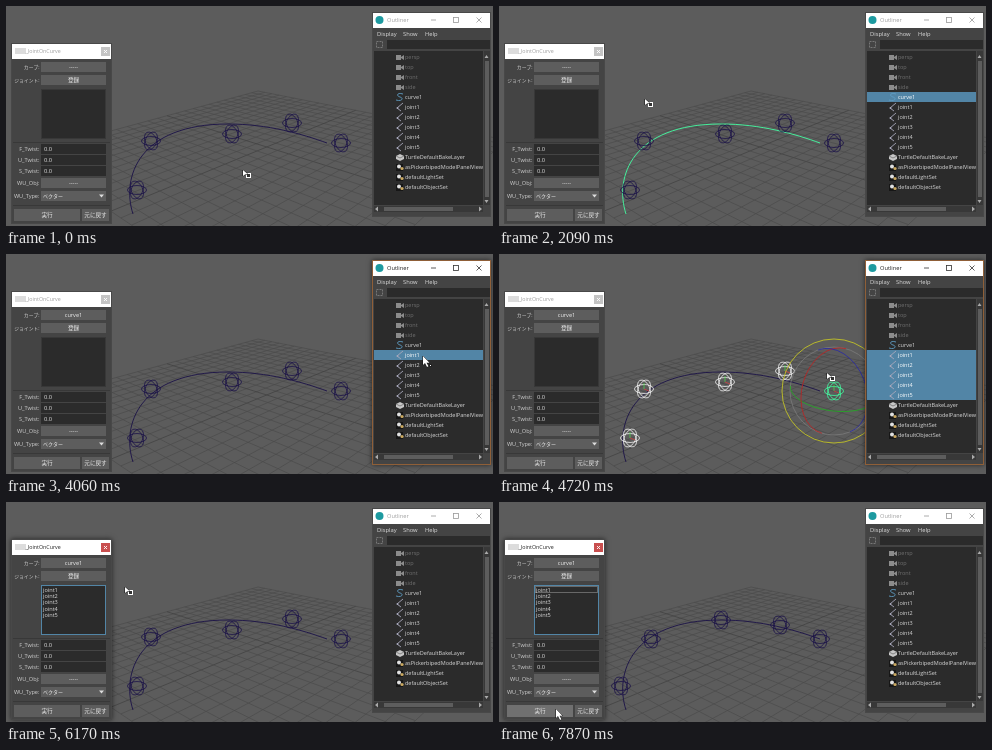
Recreate the animation shown at these times as an HTML page with a canvas. Size 487 by 220 pixels, loop 8000 ms.

```html
<!DOCTYPE html>
<html lang="ja">
<head>
<meta charset="utf-8">
<title>JointOnCurve</title>
<style>
html, body { margin: 0; width: 100%; height: 100%; overflow: hidden; background: #5c5c5c; }
canvas { display: block; width: 487px; height: 220px; }
</style>
</head>
<body>
<canvas id="stage"></canvas>
<script>
const W = 487, H = 220, LOOP = 8000;
const canvas = document.getElementById('stage');
const c = canvas.getContext('2d');
const scale = window.devicePixelRatio || 1;
canvas.width = W * scale;
canvas.height = H * scale;

const UI = '"Open Sans", "Noto Sans CJK JP", "Noto Sans CJK", sans-serif';
const NAVY = '#1b1248', DARK = '#2b2b2b', BLUE = '#5285a6', GREEN = '#43ffa3';

// cursor moves: start, end, number of steps, target x, target y
const moves = [
  [650, 890, 3, 192, 105], [1040, 1280, 3, 202, 141], [1700, 1820, 2, 226, 129],
  [1970, 2450, 5, 76, 62], [3160, 3280, 2, 400, 101], [3430, 3910, 5, 417, 102],
  [4450, 4570, 2, 414, 142], [4720, 4960, 3, 226, 91], [5110, 5470, 4, 83, 73],
  [6170, 6530, 4, 185, 108], [6650, 6770, 2, 109, 110], [6890, 6890, 1, 77, 167],
  [7010, 7010, 1, 66, 194], [7160, 7160, 1, 57, 207]
];
const loose = [[131, 184], [145, 135], [226, 128], [286, 117], [335, 137]];
const snapped = [[122, 184], [152, 137], [222, 118], [281, 123], [321, 137]];
const joints = [1, 2, 3, 4, 5].map(i => 'joint' + i);
const rows = ['persp', 'top', 'front', 'side', 'curve1', ...joints,
  'TurtleDefaultBakeLayer', 'asPickerbipedModelPanelView', 'defaultLightSet', 'defaultObjectSet'];

const within = (t, a, b) => t >= a && t < b;

function rect(x, y, w, h, fill, line) {
  if (fill) { c.fillStyle = fill; c.fillRect(x, y, w, h); }
  if (line) { c.strokeStyle = line; c.lineWidth = 1; c.strokeRect(x + .5, y + .5, w - 1, h - 1); }
}
function text(s, x, y, color = '#d0d0d0', size = 5.5, align = 'left') {
  c.font = `${size}px ${UI}`;
  c.textAlign = align;
  c.textBaseline = 'alphabetic';
  c.fillStyle = color;
  c.fillText(s, x, y + size * .36);
}
function stroke(d, color, width = 1) {
  c.strokeStyle = color;
  c.lineWidth = width;
  c.stroke(new Path2D(d));
}
function fill(d, color) {
  c.fillStyle = color;
  c.fill(new Path2D(d));
}
function ellipse(x, y, rx, ry, color, angle = 0, from = 0, to = Math.PI * 2) {
  c.beginPath();
  c.ellipse(x, y, rx, ry, angle, from, to);
  c.strokeStyle = color;
  c.lineWidth = .8;
  c.stroke();
}
function disc(x, y, r, color) {
  c.beginPath();
  c.arc(x, y, r, 0, 7);
  c.fillStyle = color;
  c.fill();
}
function panel(x, y, w, h, border, active) {
  c.save();
  c.shadowColor = active ? 'rgba(0,0,0,.6)' : 'transparent';
  c.shadowBlur = 5 * scale;
  rect(x, y, w, h, '#444');
  c.restore();
  rect(x, y, w, h, null, border);
  rect(x + 1, y + 1, w - 2, 15, '#fff');
}

function cursorAt(t) {
  let x = 237, y = 164;
  for (const [start, end, n, tx, ty] of moves) {
    if (t < start) break;
    const step = n > 1 ? (end - start) / (n - 1) : 1;
    const k = Math.min(1, (Math.floor((t - start) / step) + 1) / n);
    const e = 1 - (1 - k) ** 1.5;
    x += (tx - x) * e;
    y += (ty - y) * e;
  }
  return [Math.round(x), Math.round(y)];
}

// perspective map of the unit square onto the ground plane
const ground = (() => {
  const [[x0, y0], [x1, y1], [x2, y2], [x3, y3]] = [[252, 85], [500, 134], [290, 330], [20, 148]];
  const ax = x1 - x2, ay = y1 - y2, bx = x3 - x2, by = y3 - y2;
  const sx = x0 - x1 + x2 - x3, sy = y0 - y1 + y2 - y3, den = ax * by - bx * ay;
  const g = (sx * by - bx * sy) / den, h = (ax * sy - sx * ay) / den;
  return (u, v) => {
    const w = 1 + g * u + h * v;
    return [(x0 + (x1 - x0 + g * x1) * u + (x3 - x0 + h * x3) * v) / w,
            (y0 + (y1 - y0 + g * y1) * u + (y3 - y0 + h * y3) * v) / w];
  };
})();

function drawGrid() {
  const n = 24;
  for (let i = 0; i <= n; i++) {
    const k = i / n, color = i === n / 2 ? '#404040' : '#4b4b4b';
    stroke(`M${ground(k, 0)}L${ground(k, 1)}`, color, .7);
    stroke(`M${ground(0, k)}L${ground(1, k)}`, color, .7);
  }
}

// three orthogonal rings seen from above at an angle
function drawJoint([x, y], color) {
  const r = 9.5;
  ellipse(x, y, r, r * .47, color);
  ellipse(x, y, r, r * .6, color, 1.13);
  ellipse(x, y, r, r * .6, color, 2);
  if (color !== NAVY) {
    stroke(`M${x} ${y}v-6`, '#4fd44f', .8);
    stroke(`M${x} ${y}l5 2`, '#d04040', .8);
  }
}

function drawRotator([x, y]) {
  ellipse(x, y, 44, 44, '#7c7c7c');
  ellipse(x, y, 44, 20, '#20b020', .12, 0, Math.PI);
  ellipse(x, y, 44, 32, '#c02020', 1.85, 0, Math.PI);
  ellipse(x, y, 44, 32, '#2828a8', 1.2, Math.PI, Math.PI * 2);
  ellipse(x, y, 52, 52, '#d0d020');
}

function drawScene(t) {
  rect(0, 0, W, H, '#5c5c5c');
  drawGrid();
  const curveOn = within(t, 1400, 2760);
  stroke('M127 208C115 171 133 118 222 118C262 118 296 128 321 137', curveOn ? GREEN : NAVY, .9);
  const one = within(t, 4180, 4720), all = within(t, 4720, 6020);
  const places = t >= 7870 ? snapped : loose;
  places.forEach((p, i) => {
    const last = (one && i === 0) || (all && i === 4);
    drawJoint(p, last ? GREEN : all ? '#f4f4f4' : NAVY);
  });
  if (one) drawRotator(places[0]);
  if (all) drawRotator(places[4]);
}

function drawIcon(i, y) {
  const x = 390;
  if (i < 4) {
    rect(x, y - 2, 5, 5, '#8c8c8c');
    fill(`M${x + 5} ${y}l3-2v5l-3-2z`, '#8c8c8c');
  } else if (i === 4) {
    stroke(`M${x + 7} ${y - 3}c-6-2-7 2-3 3s2 5-4 3`, '#5f9dc4', .9);
  } else if (i < 10) {
    stroke(`M${x + 7} ${y - 4}l-6 5 4 3`, '#a9a9bc', .9);
    disc(x + 1.5, y + 1, 1, '#a9a9bc');
  } else if (i === 10) {
    fill(`M${x} ${y - 1}l4-2 4 2v3l-4 2-4-2z`, '#c8c8c8');
    stroke(`M${x} ${y - 1}l4 2 4-2`, '#666', .7);
  } else {
    rect(x, y - 3, 7, 7, '#161616');
    disc(x + 3, y - .5, 2, '#e0e0e0');
    disc(x + 6, y + 1.5, 1.6, '#c9a860');
  }
}

function drawOutliner(t) {
  const active = within(t, 4060, 5870);
  panel(366, 6, 119, 205, active ? '#8f5f38' : '#484848', active);
  disc(373.5, 14, 4, '#1d9aa0');
  text('Outliner', 381, 14, active ? '#222' : '#a0a0a0', 5.7);
  const ink = active ? '#333' : '#999';
  stroke('M425 14h5M470.500 11.500l5 5m0-5l-5 5', ink, .8);
  c.strokeRect(447.5, 11.5, 5, 5);
  ['Display', 'Show', 'Help'].forEach((s, i) => text(s, [371, 397, 419][i], 27.5, '#ddd', 5.8));
  rect(381, 34, 103, 9, DARK);
  c.setLineDash([2, 1]);
  rect(370, 35, 7, 7, null, '#777');
  c.setLineDash([]);
  rect(368, 45, 109, 154, DARK);

  c.save();
  c.beginPath();
  c.rect(368, 45, 109, 154);
  c.clip();
  rows.forEach((name, i) => {
    const y = 51 + i * 10;
    const on = i === 4 ? within(t, 1400, 2760)
      : i === 5 ? within(t, 4060, 6020)
      : i > 5 && i < 10 && within(t, 4450 + (i > 7) * 120, 6020);
    if (on) rect(368, y - 5, 109, 10, BLUE);
    drawIcon(i, y);
    text(name, 399, y, i < 4 ? '#707070' : on ? '#fff' : '#d8d8d8');
  });
  c.restore();

  rect(478, 45, 6, 154, '#383838');
  rect(479, 55, 4, 136, '#5d5d5d');
  fill('M478.500 52l2-3 2 3zM478.500 194l2 3 2-3z', '#aaa');
  rect(368, 200, 109, 6, '#383838');
  rect(378, 201, 69, 4, '#5d5d5d');
  fill('M372 200.500l-3 2.500 3 2.500zM473 200.500l3 2.500-3 2.500z', '#aaa');
}

function drawButton(label, x, y, w, h, pointer, pressed) {
  const [px, py] = pointer;
  const over = within(px, x, x + w) && within(py, y, y + h);
  rect(x, y, w, h, pressed ? DARK : over ? '#707070' : '#5d5d5d');
  text(label, x + w / 2, y + h / 2, '#eee', 5.6, 'center');
}

function drawTool(t, pointer) {
  const active = within(t, 2760, 4060) || within(t, 5870, 6290) || t >= 7720;
  panel(5, 37, 101, 181, '#484848', active);
  rect(9, 42, 11, 6, '#dcdcdc');
  text('_JointOnCurve', 19.5, 45.5, active ? '#222' : '#a0a0a0', 5.3);
  rect(95, 41, 9, 9, active ? '#c94f4f' : '#c4c4c4');
  stroke('M98 44l3 3m0-3l-3 3', '#fff', .9);

  const labels = ['カーブ:', 'ジョイント:', 'F_Twist:', 'U_Twist:', 'S_Twist:', 'WU_Obj:', 'WU_Type:'];
  const ys = [61, 74, 143, 154, 165, 177, 190];
  labels.forEach((s, i) => text(s, 33.5, ys[i], '#d0d0d0', i < 2 ? 4.8 : 5.6, 'right'));

  drawButton(t >= 2880 ? 'curve1' : '-----', 35, 56, 65, 10, pointer, within(t, 2760, 2880));
  drawButton('登録', 35, 69, 65, 10, pointer, within(t, 5870, 6020));

  rect(35, 83, 65, 50, DARK, active ? BLUE : '#383838');
  if (t >= 6020) {
    if (t >= 7720) rect(36, 84, 63, 7, null, '#686868');
    joints.forEach((s, i) => text(s, 37, 87.5 + i * 6.4, '#ddd', 5.6));
  }

  stroke('M7 136.500H104M7 199.500H104', '#383838');
  for (const y of [143, 154, 165]) {
    rect(35, y - 5, 65, 10, DARK);
    text('0.0', 38, y, '#ddd', 5.8);
  }
  drawButton('-----', 35, 172, 65, 10, pointer);
  rect(35, 185, 65, 10, '#5d5d5d');
  text('ベクター', 37, 190, '#eee', 5);
  fill('M93 188.500h5l-2.500 3z', '#ddd');

  drawButton('実行', 8, 203, 66, 12, pointer, within(t, 7720, 7870));
  drawButton('元に戻す', 76, 203, 27, 12, pointer);
}

function drawCursor(t, [x, y]) {
  c.save();
  c.translate(x, y);
  const inView = x > 106 && x < 366;
  const arrow = inView ? 'M0 0v6l2-1.500 2.500-.5z' : 'M0 0v9l2-2 2 4 1.500-.7-2-3.600h3z';
  if (inView) rect(3, 3, 5, 5, '#333', '#fff');
  else if (within(t, 4060, 4720)) rect(6, 8, 3, 3, '#fff', '#222');
  stroke(arrow, '#111', 1);
  fill(arrow, '#fff');
  c.restore();
}

function draw(t) {
  c.setTransform(scale, 0, 0, scale, 0, 0);
  const pointer = cursorAt(t);
  drawScene(t);
  if (within(t, 1040, 1400)) {
    const [x, y] = pointer;
    c.setLineDash([2, 1]);
    rect(192, 105, x - 192 + 3, y - 105 + 3, null, '#aaa');
    c.setLineDash([]);
  }
  drawOutliner(t);
  drawTool(t, pointer);
  drawCursor(t, pointer);
}

function tick() {
  draw(performance.now() % LOOP);
  requestAnimationFrame(tick);
}
tick();
</script>
</body>
</html>
```
